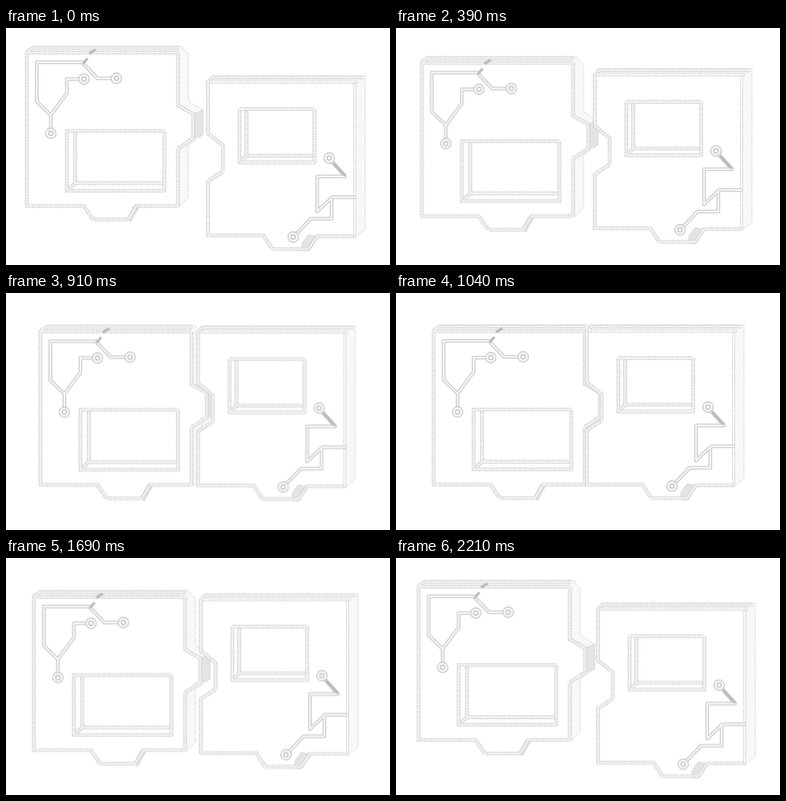
Write an HTML page that moves like this. It is 480 px wide and 297 px high and loops after 2340 ms.

```html
<!DOCTYPE html>
<html lang="en">
<head>
<meta charset="utf-8">
<title>Two modules joining</title>
<style>
  html, body { margin: 0; width: 100%; height: 100%; overflow: hidden; background: #fff; }
  svg { display: block; width: 100vw; height: 100vh; }
  path, circle { fill: none; stroke-linejoin: round; }
  .face { fill: #fff; }
  .bevel { fill: #f8f8f8; stroke: #d9d9d9; stroke-width: 1; stroke-dasharray: 5 1 2 1; }
  .shade { fill: #e4e4e4; stroke: #d2d2d2; stroke-width: .8; }
  .rim { stroke: #cacaca; stroke-width: 4.6; stroke-dasharray: 4 .7 2 .5; }
  .core { stroke: #f0f0f0; stroke-width: 2.8; }
  .trace { stroke: #c4c4c4; stroke-width: 4.4; }
  .fill { stroke: #f6f6f6; stroke-width: 2.3; }
  .tick { stroke: #bcbcbc; stroke-width: 3.4; }
  .pad { fill: #f6f6f6; stroke: #c6c6c6; stroke-width: 1.1; }
  .hole { fill: #fff; stroke: #bcbcbc; stroke-width: 1.1; }
</style>
</head>
<body>
<svg viewBox="0 0 480 297" preserveAspectRatio="none">
  <g id="left"></g>
  <g id="right"></g>
</svg>
<script>
const STEP = 130;

const path = (cls, d) => `<path class="${cls}" d="${d}"/>`;
const band = d => path('rim', d) + path('core', d);
const wire = d => path('trace', d) + path('fill', d);
const pad = (x, y) =>
  `<circle class="pad" cx="${x}" cy="${y}" r="6.6"/><circle class="hole" cx="${x}" cy="${y}" r="2.6"/>`;

// Recessed window: frame plus the inner wall on the left and bottom sides.
function recess(x0, y0, x1, y1, wall, floor) {
  const frame = `M${x0} ${y0}H${x1}V${y1}H${x0}Z`;
  const inner = `M${x0 + wall} ${y0 + 2}V${y1 - floor}H${x1 - 2}`;
  const corner = `M${x0 + 1} ${y1 - 1}L${x0 + wall} ${y1 - floor}`;
  return path('face', frame) + band(inner + corner) + band(frame);
}

const left = [
  path('face', 'M24 31L33 23H219L228 33V92L246 103V134L228 147V213L217 224H165L156 242H109L97 224H24Z'),
  path('bevel', 'M24 31L33 23H219L228 33V92L246 103V134L228 147V213L217 224H215V151L234 138V108L215 97V31Z'),
  path('shade', 'M234 108L246 103V134L234 138Z'),
  path('shade', 'M152 238L160 223H167L156 243Z'),
  band('M215 31V97L234 108V138L215 151V223H163L153 240H109L97 223H26V31H215M26 30L33 25H217'),
  path('tick', 'M104 32L112 27'),
  wire('M97 43H38.5V92L56 109V127M56 109L76 82V64H92M95 43L114 63H133'),
  path('tick', 'M96 45L102 38'),
  pad(97.5, 64), pad(138, 63), pad(56, 132),
  recess(76, 129, 198, 204, 10.5, 9.5)
];

const right = [
  path('face', 'M251 68L258 60H449V252L437 262H391L380 279H333L322 261H251V192L271 180V147L251 132Z'),
  path('bevel', 'M252 68L258 60H449V252L437 262V69H252Z'),
  path('shade', 'M370 270L378 259L390 262L379 279H370Z'),
  band('M437 261H389L378 277H333L322 260H252.5V192L271 180V147L252.5 132V68L258 62H447'),
  path('bevel', 'M254 66H440V69H254ZM434.5 69H437.5V261H434.5Z'),
  wire('M408 168L424 186H389V230L408 212H437M407 213V239H381L363 258'),
  path('tick', 'M409 169L424 185'),
  pad(404, 163), pad(359, 262),
  recess(292, 101.5, 385.5, 168.5, 8.5, 8.5)
];

// Offsets while closing; the second half of the loop retraces them.
const leftMoves = [[0, 0], [2.3, 5], [4.3, 9], [6.3, 12.8], [7.5, 15.5],
  [8.8, 17.8], [13, 17.6], [17, 17.4], [21, 17], [22, 17]];
const rightMoves = [[0, 0], [0, -3.6], [-2, -6], [-4, -9], [-6.5, -12.5],
  [-9, -15.5], [-11, -17.3], [-12.5, -18.8], [-14, -20], [-14.6, -20.4]];

function play(id, parts, moves) {
  const group = document.getElementById(id);
  group.innerHTML = parts.join('');
  const loop = [...moves, ...moves.slice(1, -1).reverse(), moves[0]];
  group.animate(
    loop.map(([x, y]) => ({ transform: `translate(${x}px, ${y}px)`, easing: 'steps(1, end)' })),
    { duration: STEP * (loop.length - 1), iterations: Infinity }
  );
}

play('left', left, leftMoves);
play('right', right, rightMoves);
</script>
</body>
</html>
```
